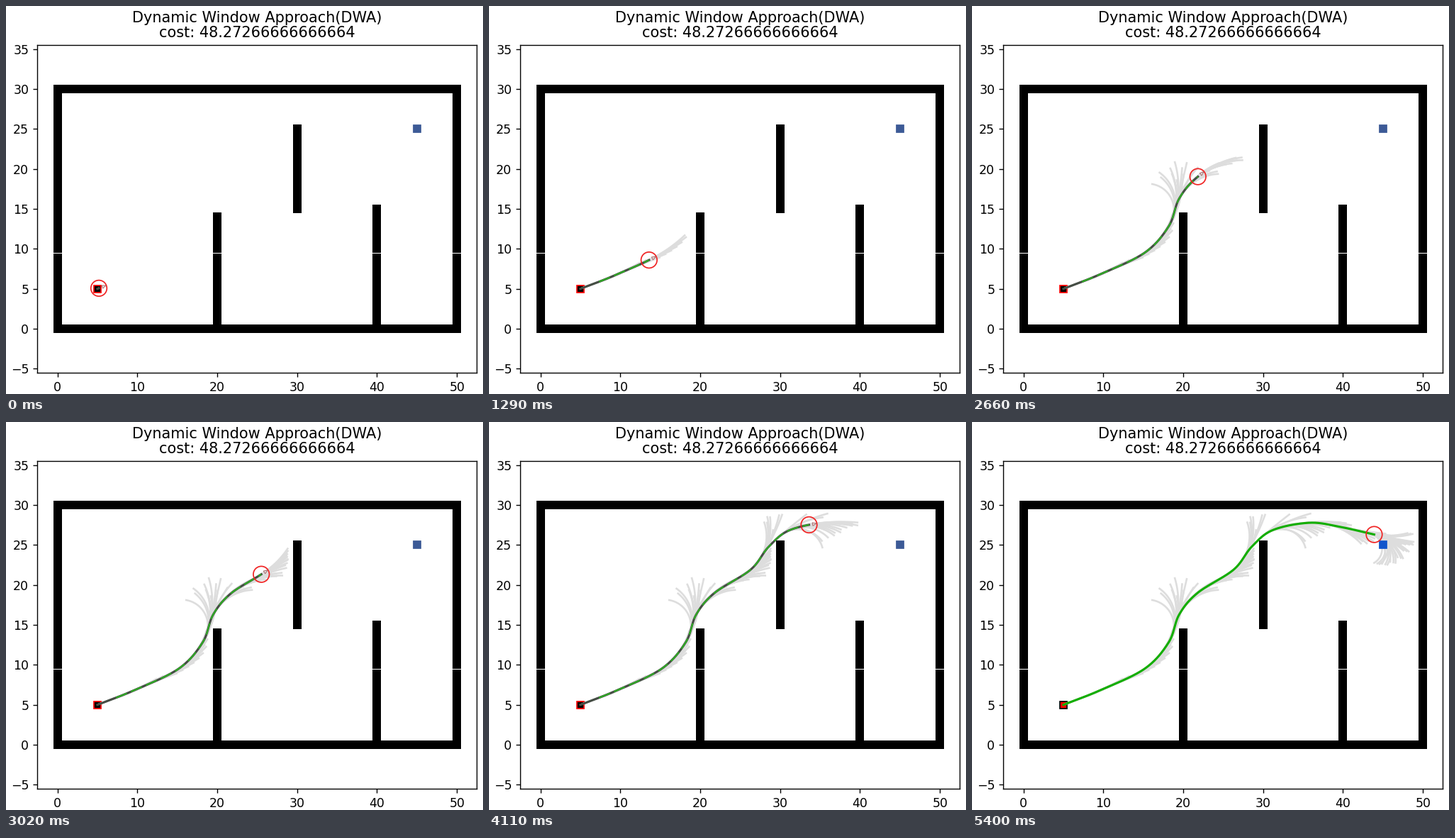
Recreate the animation shown at these times as a matplotlib script. Size 673 by 547 pixels, loop 5470 ms.

```python
import numpy as np
import matplotlib.pyplot as plt
from matplotlib.animation import FuncAnimation
from matplotlib.collections import LineCollection

W, H, DPI = 673, 547, 125
LOOP, FRAMES = 5470, 78
STEP = LOOP / FRAMES

RED, GREEN, BLUE, GREY = "#f02424", "#13ae00", "#1155cc", "#dddddd"
START, GOAL = np.array([5, 5]), np.array([45, 25])
CLEARANCE = 1.05

# Wall ends: x0, y0, x1, y1
WALLS = np.array([
    (0, 0, 50, 0), (0, 30, 50, 30), (0, 0, 0, 30), (50, 0, 50, 30),
    (20, 0, 20, 14), (30, 15, 30, 25), (40, 0, 40, 15),
])

ROUTE = np.array([
    START, (9.56, 6.8), (15.15, 9.5), (18.17, 12.8), (19.5, 16.3), (21.8, 19),
    (26.3, 21.9), (28.55, 24.75), (31.2, 26.85), (35.8, 27.77),
    (39.65, 27.25), (43.9, 26.3),
])


def px(n):
    return n * 72 / DPI


def smooth(pts, n=40):
    """Catmull-Rom curve through all points."""
    p = np.vstack([2 * pts[0] - pts[1], pts, 2 * pts[-1] - pts[-2]])
    t = np.linspace(0, 1, n, endpoint=False)[:, None]
    parts = []
    for a, b, c, d in zip(p, p[1:], p[2:], p[3:]):
        parts.append(b + 0.5 * t * (c - a + t * (
            2 * a - 5 * b + 4 * c - d + t * (3 * (b - c) + d - a))))
    return np.vstack(parts + [pts[-1:]])


CURVE = smooth(ROUTE)
STEPS = np.diff(CURVE, axis=0)
DIST = np.append(0, np.cumsum(np.hypot(*STEPS.T)))
ANGLE = np.arctan2(STEPS[:, 1], STEPS[:, 0])


def position(s):
    return np.array([np.interp(s, DIST, CURVE[:, k]) for k in (0, 1)])


def heading(s):
    return np.interp(s, DIST[1:], ANGLE)


def clock(i):
    return (i + 0.75) * STEP


def travelled(t):
    """Distance driven: spin up, cruise, then slow down near the goal."""
    spin_up = 450 * (1 - np.exp(-t / 450))
    braking = 400 * np.exp((t - LOOP) / 730)
    return np.clip(0.0105 * (t - spin_up - braking), 0.2, DIST[-1])


def wall_gap(points):
    """Distance from each point to the nearest wall."""
    p = np.atleast_2d(points)[:, None]
    off = p - np.clip(p, WALLS[:, :2], WALLS[:, 2:])
    return np.hypot(off[..., 0], off[..., 1]).min(axis=1)


def rollout(s, bend, length):
    """Arc of constant curvature, cut off where it gets too near a wall."""
    u = np.linspace(0, length, 30)
    a = heading(s) + bend * u
    ds = u[1]
    arc = position(s) + np.cumsum(np.column_stack([np.cos(a), np.sin(a)]) * ds, axis=0)
    blocked = wall_gap(arc) < CLEARANCE
    return arc[:blocked.argmax()] if blocked.any() else arc


def candidates(t):
    s = travelled(t)
    bend = (heading(s + 0.8) - heading(s - 0.8)) / 1.6
    length = 6 * (1 - np.exp(-t / 450)) ** 2
    if np.hypot(*(GOAL - position(s))) < 2.6:
        return [rollout(s, b, 0.8 * length) for b in np.linspace(-0.5, 0.1, 7)]
    spread = np.linspace(-0.13, 0.13, 4) if wall_gap(position(s))[0] < 1.5 else [-0.01, 0.01]
    return [rollout(s, bend + d, length) for d in spread]


arcs = [[arc for arc in candidates(clock(i)) if len(arc) > 1] for i in range(FRAMES)]

fig = plt.figure(figsize=(W / DPI, H / DPI), dpi=DPI, facecolor="white")
ax = fig.add_axes([44.4 / W, 30 / H, 620 / W, 462 / H])
half = 462 / 620 * 55 / 2
ax.set_xlim(-2.5, 52.5)
ax.set_ylim(15 - half, 15 + half)
ax.set_xticks(range(0, 51, 10))
ax.set_yticks(range(-5, 36, 5))
ax.set_title("Dynamic Window Approach(DWA)\ncost: 48.27266666666664",
             linespacing=1.06, pad=6.5)

for x0, y0, x1, y1 in WALLS:
    ax.plot([x0, x1], [y0, y1], "k", lw=px(12), solid_capstyle="projecting")
# Hairline seam across the upright walls
ax.plot([-0.6, 50.6], [9.5, 9.5], "white", lw=px(1), zorder=2.1)

start_mark, = ax.plot(*START, "s", color="black", zorder=2.5)
goal_mark, = ax.plot(*GOAL, "s", color=BLUE)
rays = LineCollection([], colors=GREY, linewidths=1.5, zorder=3)
ax.add_collection(rays, autolim=False)
track, = ax.plot([], [], lw=1.8, zorder=4)
dashes, = ax.plot([], [], color="#2fae24", lw=1.2, ls=(0, (8, 3)), zorder=4.1)
ring = plt.Circle(START, 1, fill=False, lw=1, ec=RED, zorder=5)
ax.add_patch(ring)
nose = plt.Polygon([(0, 0), (1, 0), (0, 1)], fc=GREY, ec="#a86060", lw=0.5, zorder=5)
ax.add_patch(nose)


def driven(s, first=0):
    keep = (DIST >= first) & (DIST < s)
    return np.vstack([CURVE[keep], position(s)]).T


def draw(i):
    last = i == FRAMES - 1
    s = travelled(clock(i))
    pos, a = position(s), heading(s)
    ahead = np.array([np.cos(a), np.sin(a)])
    side = np.array([-ahead[1], ahead[0]])

    rays.set_segments([arc for group in arcs[:i + 1] for arc in group])
    track.set_data(*driven(s))
    track.set_color(GREEN if last else "#454d44")
    dashes.set_data(*driven(s, 2.4))
    dashes.set_visible(s > 3 and not last)

    ring.center = pos
    base = pos + 0.45 * ahead
    nose.set_xy([base + 0.2 * side, base - 0.2 * side, base + 0.5 * ahead])
    nose.set_visible(not last)

    start_mark.set_markerfacecolor("#ff0000" if last else "black")
    start_mark.set_markeredgecolor("black" if last else "#ff0000")
    goal_mark.set_color(BLUE if last else "#3c5a96")
    goal_mark.set_zorder(3.5 if last else 2.5)
    return rays, track, dashes, ring, nose, start_mark, goal_mark


anim = FuncAnimation(fig, draw, frames=FRAMES, interval=STEP,
                     init_func=lambda: draw(0), repeat=True, repeat_delay=0)
plt.show()
```
